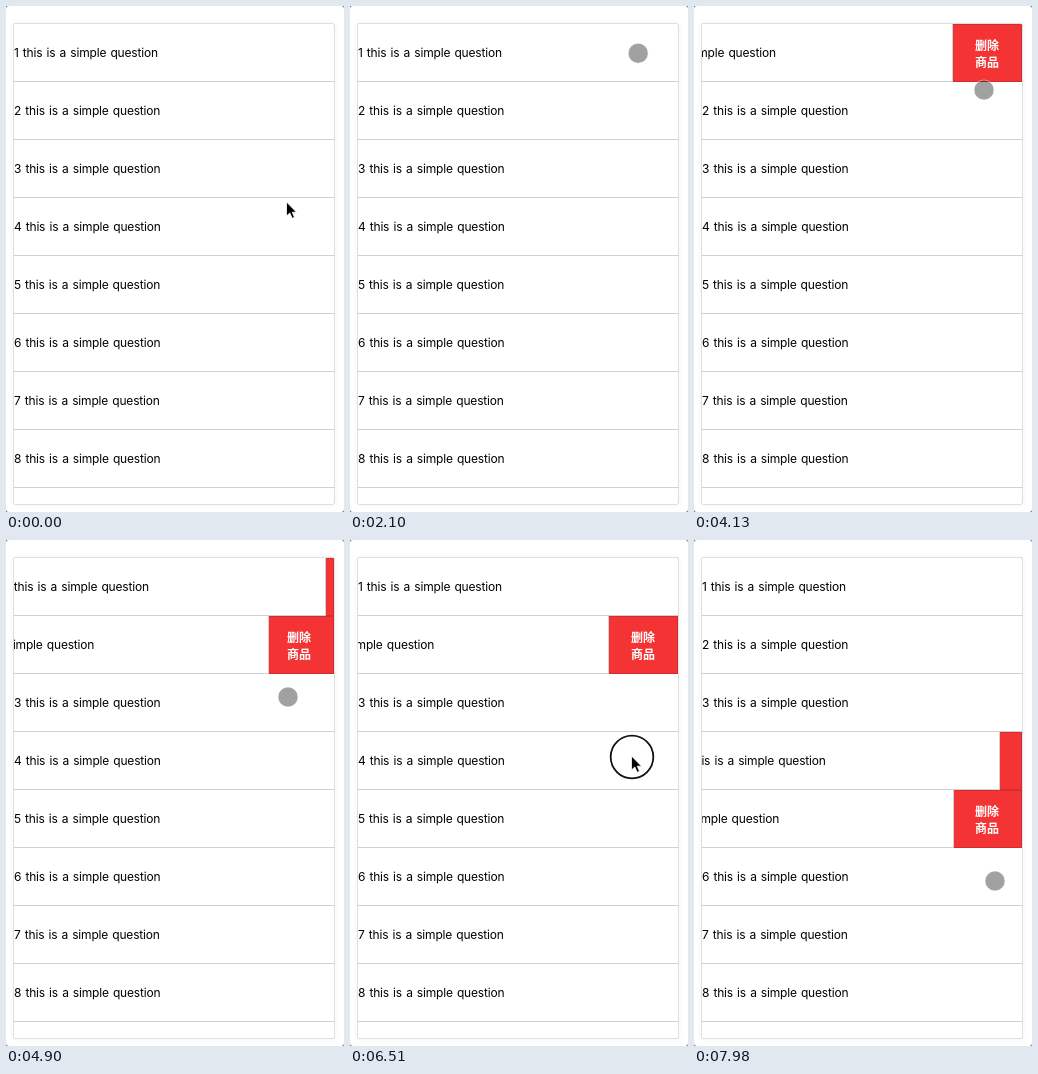
Recreate the animation shown at these times as an HTML page. Size 338x506 px, loop 8 s.

```html
<!DOCTYPE html>
<html lang="zh-CN">
<head>
<meta charset="utf-8">
<style>
html, body { margin: 0; width: 100%; height: 100%; overflow: hidden; background: #777; }
#stage { position: relative; width: 338px; height: 506px; background: #fff; border-radius: 3px; overflow: hidden; }
#card { position: absolute; left: 7px; top: 17px; width: 320px; height: 480px; overflow: hidden;
  border: 1px solid #e0e0e0; border-radius: 2px; box-shadow: 0 0 5px #0000000d; }
.row { position: relative; height: 58px; overflow: hidden; }
.delete { position: absolute; right: 0; width: 70px; height: 46px; padding-top: 12px; background: #f43434; color: #fff;
  box-shadow: inset 0 0 0 1px #0002; text-align: center;
  font: bold 12px/17px "Noto Sans CJK SC", "Noto Sans CJK", sans-serif; }
.item { position: absolute; width: 320px; height: 57px; background: #fff; white-space: pre; color: #000;
  border: solid #d0d0d0; border-width: 0 1px 1px 0;
  font: 12px/57px Inter, sans-serif; word-spacing: .08em; letter-spacing: -.015em; }
#pointer { position: absolute; left: 0; top: 0; overflow: visible; }
</style>
</head>
<body>
<div id="stage">
  <div id="card"></div>
  <svg id="pointer" width="1" height="1">
    <circle id="touch" r="10" fill="#000" fill-opacity=".37" stroke="#fff" stroke-opacity=".5"/>
    <circle id="ring" r="21.3" fill="none" stroke="#111" stroke-width="1.8"/>
    <path id="arrow" d="M-.5-1V13L2.8 10 5.2 15.3 7.5 14.3 5.2 9.2H9.5Z" fill="#000" stroke="#fff" stroke-width=".8"/>
  </svg>
</div>
<script>
const DURATION = 8000, STEP = 70, SETTLE = 300, OPEN = 70, DRIFT = 10, TOUCH_START = 280;
const $ = id => document.getElementById(id);
const clamp = p => Math.min(1, Math.max(0, p));
const smooth = p => p * p * (3 - 2 * p);
const out = p => 1 - (1 - p) ** 3;

// Each swipe drags a row left by `pull`, then the pointer hovers off to `rest`.
const swipes = [
  { row: 0, press: 2240, release: 3270, x: 285, y: 48, pull: 42, rest: [3570, 290, 62] },
  { row: 1, press: 4690, release: 4752, x: 290, y: 106, pull: 39, rest: [4900, 282, 157] },
  { row: 3, press: 6510, release: 7190, x: 282, y: 217, pull: 60, rest: [7420, 297, 257] },
  { row: 4, press: 7840, release: 7887, x: 297, y: 280, pull: 67, rest: [7980, 301, 341] }
];

const stops = [
  [70, 281, 197], [420, 298, 66], [980, 298, 66], [1470, 244, 73], [1750, 244, 73], [1890, 294, 46],
  ...swipes.flatMap(s => [
    [s.press, s.x, s.y],
    [s.release, s.x - s.pull, s.y + DRIFT],
    s.rest
  ])
];

function pointerAt(t) {
  const next = stops.findIndex(s => s[0] > t);
  if (next < 1) return stops.at(next).slice(1);
  const [t0, x0, y0] = stops[next - 1], [t1, x1, y1] = stops[next];
  const p = smooth((t - t0) / (t1 - t0));
  return [x0 + (x1 - x0) * p, y0 + (y1 - y0) * p];
}

// Releasing one row opens it and closes the row opened before.
function shiftAt(t, { press, release, pull }, following) {
  const settle = since => out(clamp((t - since) / SETTLE));
  const dragged = pull * smooth(clamp((t - press) / (release - press)));
  const opened = dragged + (OPEN - pull) * settle(release);
  return following ? opened * (1 - settle(following.release)) : opened;
}

const items = Array.from({ length: 9 }, (_, i) => {
  const row = document.createElement("div");
  row.className = "row";
  row.innerHTML = `<div class="delete">删除<br>商品</div><div class="item">${i + 1} this is a simple question</div>`;
  $("card").append(row);
  return row.lastChild;
});

function draw() {
  const now = performance.now() % DURATION;
  const t = Math.floor(now / STEP) * STEP;
  swipes.forEach((s, i) => {
    items[s.row].style.transform = `translateX(${-Math.round(shiftAt(t, s, swipes[i + 1]))}px)`;
  });

  const pressed = swipes.some(s => t >= s.press && t < s.release);
  const hovering = !pressed && t >= TOUCH_START;
  const [x, y] = pointerAt(t);
  $("pointer").style.transform = `translate(${x}px, ${y}px)`;
  $("touch").style.display = hovering ? "" : "none";
  $("arrow").style.display = hovering ? "none" : "";
  $("ring").style.display = pressed ? "" : "none";
  requestAnimationFrame(draw);
}
draw();
</script>
</body>
</html>
```
